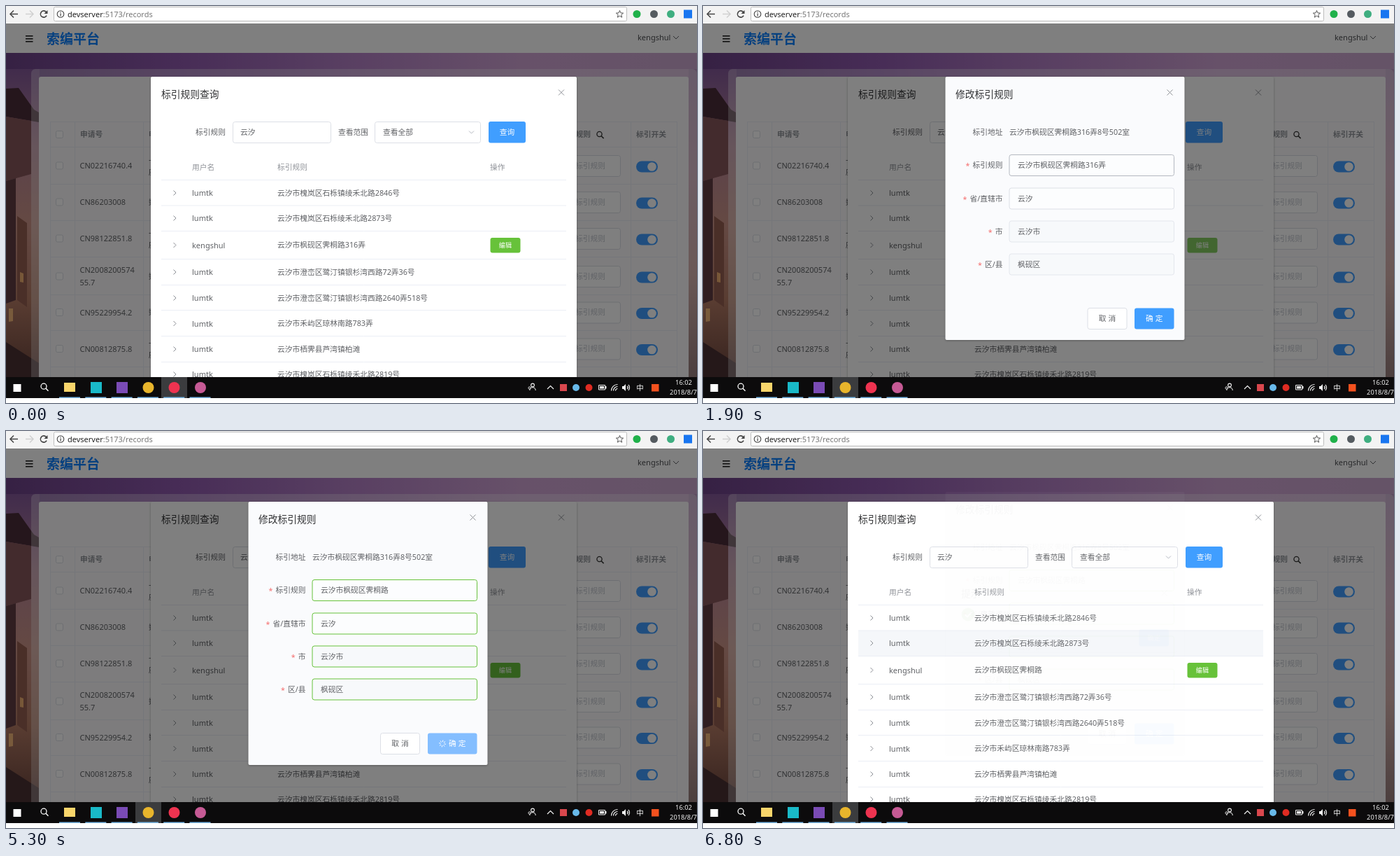
An HTML page with a canvas for the animation above (8000 ms loop, 988 by 567 pixels).

```html
<!DOCTYPE html>
<html lang="zh-CN">
<head>
<meta charset="utf-8">
<style>
html, body { margin: 0; width: 988px; height: 567px; overflow: hidden; background: #fff; }
canvas { display: block; }
</style>
</head>
<body>
<canvas id="stage" width="988" height="567"></canvas>
<script>
const W = 988, H = 567, LOOP = 8000, STEP = 100;
const FONT = '"Noto Sans", "Noto Sans CJK SC", "Noto Sans CJK", sans-serif';
const BLUE = [64, 158, 255], SKY = [102, 177, 255], PRESSED = [58, 142, 230];
const GREEN = [103, 194, 58], LIME = [133, 206, 97];
const LINE = [220, 223, 230], WHITE = [255, 255, 255];
const INK = '#606266', DARK = '#303133', SOFT = '#909399', RULE = '#ebeef5';

const USER = 'kengshul', OTHER = 'lumtk', CITY = '云汐市', PROVINCE = '云汐', AREA = '枫砚区';
const ROAD = CITY + AREA + '霁桐路', LANE = '316弄';
const RULES = [
  [OTHER, CITY + '槐岚区石栎镇绫禾北路2846号', 267],
  [OTHER, CITY + '槐岚区石栎绫禾北路2873号', 303],
  [USER, ROAD, 341.5],
  [OTHER, CITY + '澄峦区鹭汀镇银杉湾西路72弄36号', 380],
  [OTHER, CITY + '澄峦区鹭汀镇银杉湾西路2640弄518号', 417],
  [OTHER, CITY + '禾屿区琼林南路783弄', 453.5],
  [OTHER, CITY + '栖霁县芦湾镇柏滩', 490],
  [OTHER, CITY + '槐岚区石栎镇绫禾北路2819号', 526]
];
const RULE_LINES = [248.5, 285, 321.5, 361.5, 398.5, 434.5, 471.5, 508.5, 545];
const PATENTS = [
  ['CN02216740.4', 228], ['CN86203008', 280], ['CN98122851.8', 332],
  ['CN2008200574', 386, '55.7'], ['CN95229954.2', 437.5], ['CN00812875.8', 489.5]
];

const main = document.getElementById('stage').getContext('2d');
const spare = document.createElement('canvas');
spare.width = W;
spare.height = H;
const side = spare.getContext('2d');
let g = main;

const clamp = v => Math.max(0, Math.min(1, v));
const mix = (a, b, p) => a.map((v, i) => v + (b[i] - v) * p);
const rgb = c => `rgb(${c.map(Math.round)})`;
const easeOut = (t, from) => 1 - (1 - clamp((t - from) / 300)) ** 2;
const within = (t, a, b) => t >= a && t < b;

function text(s, x, y, color = INK, size = 10.75, weight = 400, align = 'left') {
  g.font = `${weight} ${size}px ${FONT}`;
  g.textAlign = align;
  g.fillStyle = color;
  g.fillText(s, x, y + size * 0.37);
}

function rect(x, y, w, h, color) {
  g.fillStyle = color;
  g.fillRect(x, y, w, h);
}

function box(x, y, w, h, r, fill, stroke) {
  g.beginPath();
  g.roundRect(x, y, w, h, r);
  if (fill) { g.fillStyle = fill; g.fill(); }
  if (stroke) { g.strokeStyle = stroke; g.lineWidth = 1; g.stroke(); }
}

function disc(x, y, r, fill, stroke, width = 1) {
  g.beginPath();
  g.arc(x, y, r, 0, 7);
  if (fill) { g.fillStyle = fill; g.fill(); }
  if (stroke) { g.strokeStyle = stroke; g.lineWidth = width; g.stroke(); }
}

function arc(x, y, r, from, to, color, width = 1.2) {
  g.beginPath();
  g.arc(x, y, r, from, to);
  g.strokeStyle = color;
  g.lineWidth = width;
  g.stroke();
}

function line(color, width, ...p) {
  g.beginPath();
  for (let i = 0; i < p.length; i += 2) g.lineTo(p[i], p[i + 1]);
  g.strokeStyle = color;
  g.lineWidth = width;
  g.stroke();
}

function poly(color, ...p) {
  g.beginPath();
  for (let i = 0; i < p.length; i += 2) g.lineTo(p[i], p[i + 1]);
  g.fillStyle = color;
  g.fill();
}

function ramp(x0, y0, x1, y1, ...colors) {
  const grad = g.createLinearGradient(x0, y0, x1, y1);
  colors.forEach((c, i) => grad.addColorStop(i / (colors.length - 1), c));
  return grad;
}

function cross(x, y) {
  line(SOFT, 1, x - 4, y - 4, x + 4, y + 4);
  line(SOFT, 1, x - 4, y + 4, x + 4, y - 4);
}

function lens(x, y, r, color) {
  disc(x, y, r, null, color, 1.3);
  const d = r * 0.7;
  line(color, 1.5, x + d, y + d, x + r + 2.5, y + r + 2.5);
}

function button(x, y, w, h, color, label, size, shift = 0) {
  box(x, y, w, h, 3, rgb(color));
  text(label, x + w / 2 + shift, y + h / 2, '#fff', size, 500, 'center');
}

function panel(x, y, w, h, fill) {
  g.save();
  g.shadowColor = 'rgba(0,0,0,.3)';
  g.shadowBlur = 3;
  g.shadowOffsetY = 1;
  box(x, y, w, h, 2, fill);
  g.restore();
}

function browserBar() {
  rect(0, 0, W, 25, '#f3f3f3');
  box(68.5, 1.5, 819, 20, 2, '#fff', '#bdbdbd');
  const arrow = (x, dir, c) => {
    line(c, 1.5, x - 5, 11.5, x + 5, 11.5);
    line(c, 1.5, x + dir, 6.5, x + dir * 6, 11.5, x + dir, 16.5);
  };
  arrow(12, -1, '#444');
  arrow(33, 1, '#d0d0d0');
  arc(54, 11.5, 4.6, 0.5, 5.6, '#444', 1.6);
  poly('#444', 59.5, 6, 59.5, 11, 54.5, 11);
  disc(78, 11.5, 4.8, null, '#444', 1.1);
  rect(77.5, 10.5, 1.2, 4, '#444');
  rect(77.5, 8.3, 1.2, 1.2, '#444');
  text('devserver', 88, 11.5, '#222', 11);
  const w = g.measureText('devserver').width;
  text(':5173/records', 88 + w, 11.5, '#777', 11);
  const star = [];
  for (let i = 0; i <= 10; i++) {
    const a = i * Math.PI / 5 - Math.PI / 2, r = i % 2 ? 2.4 : 5.4;
    star.push(877.5 + r * Math.cos(a), 11.8 + r * Math.sin(a));
  }
  line('#555', 1, ...star);
  disc(902, 11.5, 5.5, '#20b14a');
  disc(926.5, 11.5, 5.5, '#555b60');
  disc(950.5, 11.5, 5.5, '#3fae80');
  rect(969, 5.5, 12, 12, '#1976f0');
}

function backdrop() {
  rect(0, 67, W, 463, ramp(0, 67, W, 67, '#6c4288', '#9059ae', '#b480c6', '#d0a4d4', '#cba8cf'));
  rect(0, 90, 48, 440, ramp(0, 90, 0, 530, '#84589a', '#b98698', '#cb9488', '#b47a64', '#6c443c'));
  poly('#4a2c38', 0, 118, 18, 117, 40, 148, 47, 152, 47, 166, 0, 158);
  poly('#87565a', 0, 158, 36, 164, 36, 240, 0, 250);
  poly('#603c42', 0, 250, 14, 246, 14, 420, 0, 425);
  poly('#965e50', 16, 300, 30, 310, 30, 430, 16, 420);
  poly('#f0b070', 20, 380, 25, 382, 25, 395, 20, 394);
  poly('#f4b878', 4, 432, 10, 432, 10, 450, 4, 451);
  poly('#4a3032', 0, 480, 47, 510, 47, 530, 0, 530);
  rect(976, 90, 12, 440, ramp(0, 90, 0, 530, '#bc98c4', '#cc9eb4', '#c4908a', '#6c4846'));
  box(36, 90, 951.5, 470, 6, 'rgba(255,255,255,.3)');
  box(47, 101, 929, 450, 3, '#fbfafb');
}

function page() {
  rect(0, 25, W, 42, '#fff');
  backdrop();
  [43, 47, 51].forEach(y => rect(28, y - 1, 10.5, 1.6, '#222'));
  text('索编平台', 58, 46.5, '#0b80ff', 19, 700);
  text(USER, 903, 45, '#4c4e52', 11);
  line(INK, 1, 954, 43, 958, 47, 962, 43);

  [165.5, 201.5, 254.5, 306.5, 358.5, 412.5, 463.5, 515.5].forEach(y => line(RULE, 1, 63, y, 960, y));
  [63.5, 98.5, 196.5, 893.5, 959.5].forEach(x => line(RULE, 1, x, 165, x, 530));
  const check = y => box(71.5, y - 5, 10, 10, 2, '#fff', rgb(LINE));
  check(183.5);
  text('申请号', 106, 183.5, SOFT, 10.75, 700);
  text('申请人', 204, 183.5, SOFT, 10.75, 700);
  text('标引规则', 793, 183.5, SOFT, 10.75, 700);
  text('标引开关', 901, 183.5, SOFT, 10.75, 700);
  lens(848.5, 183, 3.6, '#333');
  PATENTS.forEach(([id, y, rest], i) => {
    check(y);
    if (rest) {
      text(id, 105.5, y - 9, INK, 11);
      text(rest, 105.5, y + 8.5, INK, 11);
    } else text(id, 105.5, y, INK, 11);
    if (i % 5 == 0 || i == 2) {
      text('一种', 204, y - 7, INK);
      text('座椅', 204, y + 9, INK);
    } else text('数据', 204, y, INK);
    box(793.5, y - 14.5, 85, 30, 3, '#fff', rgb(LINE));
    text('标引规则', 814, y, '#c0c4cc');
    box(901, y - 6.5, 31, 16, 8, rgb(BLUE));
    disc(923.5, y + 1.5, 6.3, '#fff');
  });
}

function queryDialog(t) {
  panel(207, 101, 609, 460, '#fff');
  text('标引规则查询', 222, 125.5, DARK, 13.75);
  cross(794, 123.5);
  text('标引规则', 271, 180.5);
  box(324.5, 165.5, 140, 30, 3, '#fff', rgb(LINE));
  text(PROVINCE, 335, 180.5);
  text('查看范围', 475, 180.5);
  box(527.5, 165.5, 151, 30, 3, '#fff', rgb(LINE));
  text('查看全部', 539, 180.5);
  line('#b4b8c0', 1, 662, 178.5, 665.5, 182, 669, 178.5);
  button(690, 165, 53, 30.5, BLUE, '查询', 10.75);

  const hover = (i, p) => {
    if (p > 0) rect(222, RULE_LINES[i], 579, RULE_LINES[i + 1] - RULE_LINES[i], rgb(mix(WHITE, [245, 247, 250], p)));
  };
  hover(2, t < 1500 ? clamp((t - 400) / 400) : 0);
  hover(1, clamp((t - 6500) / 300));
  text('用户名', 266, 230.5, SOFT, 10.75, 500);
  text('标引规则', 388, 230.5, SOFT, 10.75, 500);
  text('操作', 692, 230.5, SOFT, 10.75, 500);
  RULES.forEach(([name, rule, y], i) => {
    line(RULE, 1, 222, RULE_LINES[i], 801, RULE_LINES[i]);
    line('#8a8d93', 1, 239.5, y - 3.5, 243, y, 239.5, y + 3.5);
    text(name, 266, y, INK, 11);
    text(rule + (i == 2 && t < 6500 ? LANE : ''), 388, y);
  });
  const lit = clamp((t - 400) / 400) * (1 - clamp((t - 2000) / 300));
  button(692.5, 331, 43, 21.5, mix(GREEN, LIME, lit), '编辑', 9.2);
}

const FIELDS = [['标引规则', 212.5], ['省/直辖市', 260], ['市', 307], ['区/县', 354]];

function fieldBorder(i, t) {
  const base = i > 1 ? [228, 231, 237] : LINE;
  const grey = [180, 184, 192];
  if (t >= 5100) return mix(base, GREEN, clamp((t - 5000) / 200));
  if (i || t < 1900) return base;
  return mix(grey, BLUE, clamp((t - 2000) / 300));
}

function typed(t) {
  const cut = [2900, 3100, 3300, 3600].filter(at => t >= at).length;
  return ROAD + LANE.slice(0, 4 - cut);
}

function editDialog(t) {
  panel(346.5, 101, 342, 376, '#fafbfd');
  text('修改标引规则', 361, 125.5, DARK, 13.75);
  cross(667.5, 123.5);
  text('标引地址', 428.5, 180.5, INK, 10.75, 400, 'right');
  text(ROAD + LANE + '8号502室', 438, 180.5);
  const value = typed(t);
  const values = [value, PROVINCE, CITY, AREA];
  FIELDS.forEach(([label, y], i) => {
    const mid = y + 15;
    text(label, 428.5, mid, INK, 10.75, 400, 'right');
    text('*', 428.5 - g.measureText(label).width - 7, mid + 1, '#f56c6c', 10.75, 400, 'center');
    box(438, y, 235.5, 30, 3, i > 1 ? '#f7f9fb' : '#fcfdfe', rgb(fieldBorder(i, t)));
    text(values[i], 450, mid);
  });
  if (within(t, 2200, 2600) || within(t, 3100, 3600) || within(t, 4100, 4500)) {
    rect(Math.round(450 + g.measureText(value).width), 220, 1, 15, '#222');
  }
  const busy = within(t, 5200, 5400), x = busy ? 535.5 : 550;
  box(x, 431.5, 56, 30, 3, '#fff', rgb(LINE));
  text('取 消', x + 28, 446.5, INK, 10.75, 400, 'center');
  if (busy) {
    button(603, 431.5, 70.5, 30, [132, 190, 255], '确 定', 10.75, 7);
    spinner(624, 446.5, t);
  } else {
    const color = within(t, 4800, 5000) ? SKY : within(t, 5000, 5200) ? PRESSED : BLUE;
    button(617, 431.5, 56.5, 30, color, '确 定', 10.75);
  }
}

function spinner(x, y, t) {
  for (let i = 0; i < 8; i++) {
    const a = i * Math.PI / 4 + t / 2000 * Math.PI * 2, c = Math.cos(a), s = Math.sin(a);
    line('#fff', 1, x + c * 2.4, y + s * 2.4, x + c * 5, y + s * 5);
  }
}

function notice(t) {
  panel(357, 226, 321, 103.5, '#fff');
  text('提示', 369, 245.5, DARK, 13.75);
  cross(659.5, 245.5);
  disc(379, 276, 9.3, rgb(GREEN));
  line('#fff', 2, 374.5, 276, 378, 279.5, 384, 272.8);
  text('修改成功', 396.5, 276.5);
  button(623.5, 297, 42.5, 24.5, t == 6300 ? PRESSED : SKY, '确定', 9.2);
}

function inputBar() {
  const c = '#1a6fc4';
  rect(900, 503, 88, 17.5, '#fafcff');
  box(883, 502.5, 18, 17, 2, '#f4511e');
  text('中', 911.5, 511.5, c, 11.5, 700, 'center');
  disc(926, 509, 1.6, null, c, 1.2);
  line(c, 1.8, 931.5, 512, 930.5, 515.5);
  disc(945, 511.5, 5.3, null, c, 1.2);
  rect(942.3, 509, 1.4, 1.6, c);
  rect(946.3, 509, 1.4, 1.6, c);
  arc(945, 511.5, 3, 0.3, 2.84, c);
  box(960, 505.5, 4, 7.5, 2, c);
  arc(962, 511, 4, 0, Math.PI, c);
  line(c, 1.2, 962, 515, 962, 517.5);
  box(973.5, 507, 11, 9, 1, null, c);
  [509.5, 511.5].forEach(y => {
    for (let x = 975; x < 984; x += 2) rect(x, y, 1, 1, c);
  });
  rect(976, 513.5, 6, 1, c);
}

function taskbar(t) {
  rect(0, 530, W, 30, '#0c0b0c');
  rect(0, 560, W, 7, '#fff');
  rect(t < 1100 ? 222 : 185, 530, 37, 30, '#3b3c3e');
  for (let i = 0; i < 6; i++) rect(76 + i * 37.3, 558.5, 30, 1.5, '#79b7e6');
  rect(10.5, 540, 11, 11, '#fff');
  lens(54, 543.2, 4, '#fff');
  rect(83, 538, 16, 13, '#f8d56b');
  rect(121, 537, 16, 16, '#19b9c8');
  rect(158, 537, 16, 16, '#7a4bb5');
  disc(203.5, 545, 8, '#e8b52c');
  disc(240.5, 545, 8, '#ee3350');
  disc(278, 545, 8, '#c65a95');

  const w = '#f2f2f2';
  disc(753, 541.5, 2.4, null, w, 1.1);
  arc(753, 549, 4.2, Math.PI, 0, w, 1.1);
  disc(748.5, 545.5, 1.6, null, w);
  line(w, 1.2, 774, 547, 778.5, 542.5, 783, 547);
  rect(792, 540, 10, 10, '#d9474d');
  disc(815, 545, 5, '#68b9ea');
  disc(833.5, 545, 5, '#e02b22');
  box(847.5, 541.5, 9, 6.5, 0, null, w);
  rect(849, 543, 6, 3.5, w);
  rect(857, 543, 1.5, 3.5, w);
  [3, 6, 9].forEach(r => arc(874.5, 549.5, r, Math.PI, Math.PI * 1.5, w));
  poly(w, 881, 543, 883, 543, 886, 540, 886, 550, 883, 547, 881, 547);
  [3, 5.5].forEach(r => arc(886, 545, r, -0.8, 0.8, w));
  text('中', 906.5, 545, w, 10.5, 400, 'center');
  rect(923, 540, 10.5, 10.5, '#f4511e');
  text('16:02', 969, 538, w, 9.3, 400, 'center');
  text('2018/8/7', 968.5, 552, w, 9.3, 400, 'center');
}

// Draws a group at one opacity, shifted vertically.
function layer(t, paint, [alpha, dy]) {
  if (alpha <= 0) return;
  if (alpha == 1) return paint(t);
  side.clearRect(0, 0, W, H);
  g = side;
  paint(t);
  g = main;
  g.globalAlpha = alpha;
  g.drawImage(spare, 0, dy);
  g.globalAlpha = 1;
}

// Opacity and rise of a popup that opens at a given time; a faint trace stays after closing.
function fade(t, from) {
  if (t >= 6800) return [0.03, -14];
  const p = t < 6500 ? easeOut(t, from) : 1 - clamp((t - 6467) / 333);
  return [p, -20 * (1 - p)];
}

function draw(t) {
  const level = within(t, 5400, 6500) ? 2 : within(t, 1200, 6500) ? 1 : 0;
  const shade = at => {
    if (level == at) rect(0, 25, W, 505, 'rgba(0,0,0,.5)');
  };
  browserBar();
  page();
  shade(0);
  queryDialog(t);
  shade(1);
  layer(t, editDialog, fade(t, 1180));
  shade(2);
  layer(t, notice, fade(t, 5365));
  if (within(t, 2200, 5100)) inputBar();
  taskbar(t);
}

let last = -1;
function tick() {
  const t = Math.floor(performance.now() % LOOP / STEP) * STEP;
  if (t != last) draw(last = t);
  requestAnimationFrame(tick);
}
tick();
</script>
</body>
</html>
```
